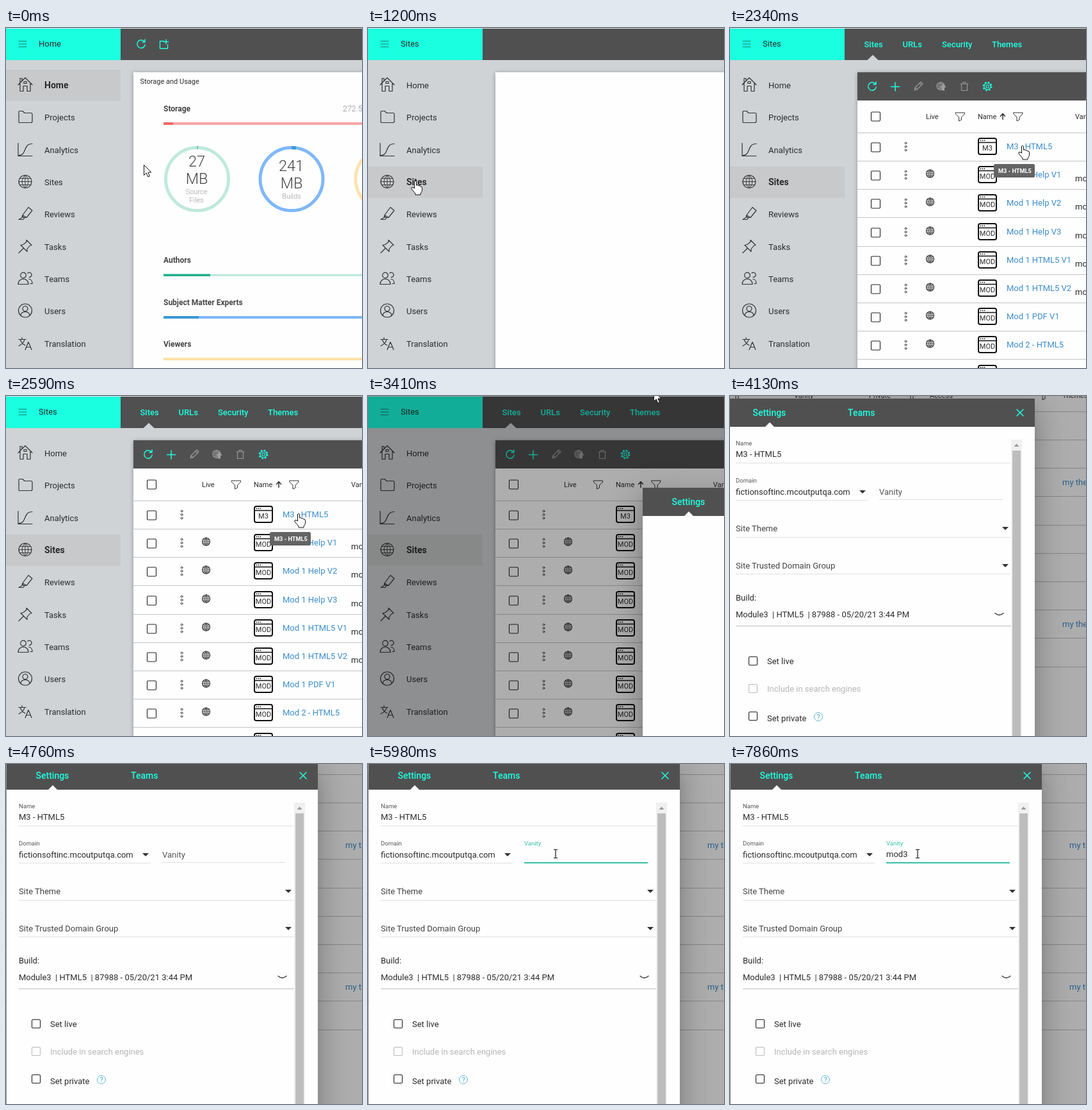
Write an HTML page that moves like this. It is 556x530 px and loops after 8000 ms.

```html
<!DOCTYPE html>
<html lang="en">
<head>
<meta charset="utf-8">
<title>Site settings</title>
<style>
html, body { margin: 0; width: 100%; height: 100%; overflow: hidden; }
#stage { position: relative; width: 556px; height: 530px; overflow: hidden; background: #cfd3d5; }
#world, #page, #shade, #dialog, #top { position: absolute; left: 0; top: 0; }
#page, #shade, #top { width: 1100px; height: 700px; }
#shade { background: rgba(0,0,0,.32); }
#dialog { left: 429px; top: 143px; width: 486px; height: 600px; background: #fefefe;
  box-shadow: 0 11px 15px -7px rgba(0,0,0,.2), 0 24px 38px 3px rgba(0,0,0,.14), 0 9px 46px 8px rgba(0,0,0,.12); }
svg { display: block; font: 13px Roboto, Arial, sans-serif; fill: #2b2b2b; }
.ln { fill: none; stroke: #333; stroke-width: 1.2; stroke-linejoin: round; stroke-linecap: round; }
.teal { stroke: #1fffe0; }
.dim { stroke: #9a9a9a; }
.s11 { font-size: 11px; }
.b { font-weight: 700; font-size: 12px; fill: #444; }
.tab { font-weight: 500; fill: #1fffe0; }
.big { font-size: 23.5px; font-weight: 300; fill: #444; text-anchor: middle; }
.sub { font-size: 11px; font-weight: 300; fill: #999; text-anchor: middle; }
.lab { font-size: 9.5px; fill: #555; }
.link { fill: #3b8ccb; }
</style>
</head>
<body>
<div id="stage"><div id="world">
  <svg id="page"></svg>
  <div id="shade"></div>
  <div id="dialog"><svg id="form" width="486" height="600"></svg></div>
  <svg id="top"></svg>
</div></div>
<script>
const $ = id => document.getElementById(id);
const text = (x, y, s, a = '') => `<text x="${x}" y="${y}" xml:space="preserve" ${a}>${s}</text>`;
const rect = (x, y, w, h, fill, a = '') => `<rect x="${x}" y="${y}" width="${w}" height="${h}" fill="${fill}" ${a}/>`;
const line = (d, cls = '', a = '') => `<path d="${d}" class="ln ${cls}" ${a}/>`;
const shape = (d, fill) => `<path d="${d}" fill="${fill}"/>`;
const disc = (x, y, r, cls = '', a = '') => `<circle cx="${x}" cy="${y}" r="${r}" class="ln ${cls}" ${a}/>`;
const at = (x, y, body, a = '') => `<g transform="translate(${x} ${y})" ${a}>${body}</g>`;
const box = (x, y, s, color = '#222') => rect(x, y, s, s, 'none', `rx="1.5" stroke="${color}" stroke-width="1.1"`);
const globe = (r, cls = '') => disc(0, 0, r, cls) + line(
  `M${-r} 0H${r}M0 ${-r}V${r}M${-r * .85} ${-r / 2}H${r * .85}M${-r * .85} ${r / 2}H${r * .85}` +
  `M0 ${-r}C${-r * .65} ${-r / 2} ${-r * .65} ${r / 2} 0 ${r}C${r * .65} ${r / 2} ${r * .65} ${-r / 2} 0 ${-r}`, cls, 'style="stroke-width:.9"');
const refresh = line('M5.2-3.5A6.2 6.2 0 1 0 6.2 1M6-7V-3H2', 'teal', 'style="stroke-width:1.5"');
const funnel = line('M-7-6H7V-4L2 1V5L-2 7V1L-7-4Z', '', 'style="stroke-width:1"');

// Sidebar
const menu = [
  ['Home', line('M-11 0L0-11 11 0M-8-2V10H-3V2H3V10H8V-2M-8-4V-10H-5V-7M-2-5H2V-2H-2Z')],
  ['Projects', line('M-10 8V-8q0-1 1-1h5l3 3h10q2 0 2 2V7q0 2-2 2H-9q-1 0-1-1z')],
  ['Analytics', line('M-11-10V10H11M-10 9C3 9-4-9 11-9')],
  ['Sites', globe(10)],
  ['Reviews', line('M-4 2L5-10 11-5 2 6H-3ZM-4 2L-5 6-10 9H-3L-1 6M-3 3L2 6')],
  ['Tasks', line('M2-10L10-2 7-1 3 4V8L-7-2-3-3 2-7ZM-3 3L-10 10')],
  ['Teams', disc(-3, -5, 4.3) + line('M-11 9C-11-2 5-2 5 9ZM4-8.5a3.7 3.7 0 1 1 2 6.5M6 1C9 1 11 4 11 8H8')],
  ['Users', disc(0, 0, 10.5) + disc(0, -3, 4) + line('M-7 7.5C-6 0 6 0 7 7.5')],
  ['Translation', line('M-10-6H1M-5-9V-6M-1-6C-2-1-6 2-10 4M-8-6C-6-1-3 2 0 3M0 10L5-2 10 10M2 6H8')]
];
const rowY = i => Math.round(89 + 50.35 * i);
const sidebar = rect(0, 0, 0, 48.5, '#c7c9ca', 'id="pick"') + menu.map(([name, icon], i) =>
  at(30, rowY(i) - .5, icon) + text(60, rowY(i) + 5, name, `id="m${i}"`)).join('');
const header = rect(0, 0, 1100, 1, '#e2e4e4') + rect(179, 1, 921, 49, '#505050') + rect(0, 1, 179, 49, '#1affdf') +
  line('M20 20.5H32M20 25H32M20 29.5H32', '', 'style="stroke:#17887a;stroke-width:1"') + text(51, 29, 'Home', 'id="title"');

// Home page
const bar = (y, h, dark, light, x) => rect(246, y, 800, h, light) + rect(246, y, x - 246, h, dark);
const ring = (x, color, dark, len) =>
  `<circle cx="${x}" cy="235.5" r="49" fill="none" stroke="${color}" stroke-width="5"/>` +
  `<circle cx="${x}" cy="235.5" r="49" fill="none" stroke="${dark}" stroke-width="5" stroke-dasharray="${len} 400" transform="rotate(-90 ${x} 235.5)"/>`;
const home = at(211, 25, refresh) +
  line('M247 20.5H240.500V32H252.500V26M250 18V25M246.500 21.500H253.500', 'teal', 'style="stroke-width:1.4"');
const storage = text(209.5, 87, 'Storage and Usage', 'class="s11"') +
  text(246, 130, 'Storage', 'class="b"') + text(526, 130, '272.5 MB', 'style="font-size:12.5px;font-weight:300;fill:#888"') +
  bar(147, 4, '#f16666', '#f9a6a6', 261) +
  ring(298.5, '#c0e9dd', '#24b28e', 1.2) + ring(446, '#7fb8fb', '#3c9bd5', 7) + ring(595, '#ffe2b0', '#f5b84a', 5) +
  text(298, 216, '27', 'class="big"') + text(298, 243, 'MB', 'class="big"') +
  text(297.5, 259, 'Source', 'class="sub"') + text(297.5, 272, 'Files', 'class="sub"') +
  text(445.5, 223, '241', 'class="big"') + text(446, 250, 'MB', 'class="big"') + text(446, 266, 'Builds', 'class="sub"') +
  text(246, 366, 'Authors', 'class="b"') + bar(383.500, 3.500, '#21b08c', '#c0e9dd', 319) +
  text(246, 432, 'Subject Matter Experts', 'class="b"') + bar(449, 4, '#3a98d2', '#7fb8fb', 301) +
  text(246, 497, 'Viewers', 'class="b"') + bar(514, 4, '#ffe2a8', '#ffe2a8', 246);

// Sites page
const names = ['M3 - HTML5', 'Mod 1 Help V1', 'Mod 1 Help V2', 'Mod 1 Help V3', 'Mod 1 HTML5 V1', 'Mod 1 HTML5 V2', 'Mod 1 PDF V1', 'Mod 2 - HTML5', ''];
const tableRow = (name, i) => {
  const y = Math.round(163 + 44.2 * i);
  return box(220.5, y + 16, 14) +
    [16.500, 22, 27.500].map(d => disc(274.5, y + d, 1.4, '', 'style="stroke-width:1"')).join('') +
    (i ? at(312.5, y + 20, globe(6)) : '') +
    rect(388, y + 9, 28, 25, 'none', 'rx="3" stroke="#111" stroke-width="2"') +
    line(`M388 ${y + 15.5}H416`, '', 'style="stroke:#111;stroke-width:1.6"') +
    line(`M391.5 ${y + 12.3}h0m3 0h0m3 0h0`, '', 'style="stroke:#111;stroke-width:1.8"') +
    text(402, y + 28, i ? 'MOD' : 'M3', 'class="s11" text-anchor="middle"') +
    text(432, y + 25.500, name, 'class="link"') +
    (i > 0 && i < 6 ? text(539, y + 32, 'mod1') : '') +
    (i == 2 || i == 7 ? text(958, y + 26.500, 'my theme', 'class="link"') : '') +
    rect(199, y + 44, 901, 1, '#c4c4c4');
};
const tabs = [[209.5, 'Sites'], [269.5, 'URLs'], [331, 'Security'], [409, 'Themes']];
const heads = [[306, 'Live'], [387, 'Name'], [539, 'Vanity'], [656, 'Private'], [751, 'Access'], [958, 'Themes']];
const sites = tabs.map(([x, s]) => text(x, 30, s, 'class="tab"')).join('') + shape('M214.500 50L223 42 231.500 50Z', '#cfd3d5') +
  rect(199, 69, 901, 44, '#505050') + at(222, 91, refresh) +
  line('M251.500 91.500H264.500M258 85V98', 'teal', 'style="stroke-width:1.5"') +
  at(294, 91, line('M-6 6L-5 2 4-7 7-4-2 5ZM2-5L5-2M-5 2L-2 5', 'dim')) +
  at(329, 90.500, globe(6, 'dim') + shape('M2 7V2H-1L4-3 9 2H6V7Z', '#a0a0a0')) +
  at(366, 91, line('M-6-4H6M-4.500-4V6.500H4.500V-4M-2-4V-6.500H2V-4', 'dim')) +
  at(402, 91, disc(0, 0, 2.2, 'teal') + disc(0, 0, 5, 'teal') +
    disc(0, 0, 6.4, 'teal', 'style="stroke-width:2;stroke-linecap:butt" stroke-dasharray="2.500 2.526"')) +
  box(220.5, 131, 14) + heads.map(([x, s]) => text(x, 142, s, 'class="s11"')).join('') +
  text(867, 125, 'Trusted', 'class="s11" text-anchor="middle"') + text(867, 138, 'Domain', 'class="s11" text-anchor="middle"') +
  [359.5, 450, 723, 929].map(x => at(x, 138, funnel)).join('') +
  line('M426 142.500V134M422.500 137.500L426 133.500 429.500 137.500', '', 'style="stroke-width:1.5"') +
  rect(199, 163, 901, 1, '#c4c4c4') + names.map(tableRow).join('');

$('page').innerHTML = rect(0, 0, 1100, 700, '#cfd3d5') + sidebar + header +
  rect(199, 69, 920, 700, '#fefefe', 'style="filter:drop-shadow(0 1px 3px rgba(0,0,0,.3))"') +
  `<g id="home">${home}${storage}</g><g id="sites">${sites}</g>`;

// Settings dialog
const drop = (x, y) => shape(`M${x - 5} ${y - 2.5}H${x + 5}L${x} ${y + 2.5}Z`, '#333');
const rule = (x, y, x2, c = '#e0e0e0') => rect(x, y, x2 - x, 1, c);
const fields = text(20, 69, 'Name', 'class="lab"') + text(20, 87, 'M3 - HTML5') + rule(20, 96, 449) +
  text(20, 127, 'Domain', 'class="lab"') + text(20, 146, 'fictionsoftinc.mcoutputqa.com') + rule(20, 154, 226) + drop(218, 141.5) +
  rule(244, 153, 437) + rect(244, 153, 193, 2, '#35c0a5', 'id="focus"') +
  text(0, 0, 'Vanity', 'id="vanity"') + text(244, 145, '', 'id="typed"') + rect(0, 133, 1, 15, '#222', 'id="caret"') +
  text(20, 203, 'Site Theme', 'fill="#444"') + rule(20, 212, 449) + drop(441, 198.5) +
  text(20, 261, 'Site Trusted Domain Group', 'fill="#444"') + rule(20, 269, 449) + drop(441, 256.5) +
  text(20, 311, 'Build:') + text(20, 337, 'Module3  | HTML5  | 87988 - 05/20/21 3:44 PM') + rule(20, 350, 450, '#bdbdbd') +
  line('M425 330.500Q431.500 336.500 438 330.500') +
  box(40.5, 398.5, 13) + text(69, 410, 'Set live') +
  box(40.5, 441.5, 13, '#bbb') + text(69, 453, 'Include in search engines', 'fill="#b5b5b5"') +
  box(40.5, 484.5, 13) + text(69, 499, 'Set private') +
  disc(149, 492, 6.5, '', 'style="stroke:#5fb7e2;stroke-width:1"') + text(149, 496, '?', 'class="s11" text-anchor="middle" fill="#3fa5d8"') +
  rect(450, 60, 17, 600, '#f0f0f0') + rect(452, 77, 13, 600, '#bdbdbd') + shape('M454.500 71L458.500 66.500 462.500 71Z', '#999');
$('form').innerHTML = rect(0, 0, 486, 44, '#505050') + `<g transform="translate(-1 4)">` +
  text(46.5, 23, 'Settings', 'class="tab" style="font-size:14px"') + text(195, 23, 'Teams', 'class="tab" style="font-size:14px"') +
  shape('M65.500 40.500L73 33 80.500 40.500Z', '#fefefe') + line('M459 13L469 23M469 13L459 23', 'teal', 'style="stroke-width:1.5"') +
  `<g id="fields">${fields}</g></g>` +
  at(243, 346, `<circle id="spin" r="40.500" fill="none" stroke="#1fffe0" stroke-width="9" pathLength="360" stroke-dasharray="195 165"/>`);

// Tooltip and pointers
$('top').innerHTML = `<g id="tip">${rect(412, 212, 64, 21, '#646464', 'rx="2.5"')}${text(419, 225.5, 'M3 - HTML5', 'style="font-size:9.2px;font-weight:700;fill:#fff"')}</g>
<g id="pointer">
<path id="arrow" d="M.5.5V16.500L4.200 13 6.800 19 9.400 17.900 6.900 12H11.800Z" fill="#fff" stroke="#111"/>
<path id="hand" d="M-1.500 12V1.500Q0-1 1.500 1.500V7Q4 5.500 4.500 8 7 6.500 7.500 9 10 8 10.500 11V15Q10 18 8 20V22H0V20L-6 13Q-7 10-4 10.500Z" fill="#fff" stroke="#111"/>
<path id="beam" d="M-3-6.500H-.500L0-6 .5-6.500H3M-3 6.500H-.500L0 6 .5 6.500H3M0-6V6" fill="none" stroke="#111" stroke-width="1.200"/>
</g>`;

const camera = [[0, 0, 0], [3550, -170, -56], [3700, -328, -107], [3850, -400, -129], [3990, -431, -137],
  [4130, -439, -139], [4260, -436, -142], [4400, -431, -145], [4500, -428, -147]];
const typing = [[0, ''], [6280, 'm'], [6420, 'mo'], [6570, 'mod'], [7430, 'mod3']];
const caretX = [244, 255, 262, 269, 276];
const travel = [[260, 930, 6, 215, 213, 74, 238], [1350, 2200, 7, 74, 238, 457, 183],
  [2727, 3405, 6, 457, 183, 446, -8], [3545, 3545, 1, 446, -8, 446, -40], [4760, 5290, 5, 752, 110, 721, 287]];

const last = (table, t) => table.filter(r => r[0] <= t).pop();
const steps = (t, a, b, n) => t < a ? 0 : t >= b ? 1 : (Math.floor((t - a) / (b - a) * (n - 1) + .05) + 1) / n;
const ease = p => p * p * (3 - 2 * p);
const show = (id, on) => { $(id).style.display = on ? '' : 'none'; };

function point(t) {
  const [a, b, n, x, y, x2, y2] = last(travel, t) || travel[0];
  const p = ease(steps(t, a, b, n));
  return [x + (x2 - x) * p, y + (y2 - y) * p];
}

function draw(t) {
  const [, cx, cy] = last(camera, t);
  $('world').style.transform = `translate(${cx}px,${cy}px)`;

  const picked = t < 1060 ? 0 : 3;
  $('title').textContent = menu[picked][0];
  $('pick').setAttribute('width', 179);
  $('pick').setAttribute('y', rowY(picked) - 24);
  menu.forEach((m, i) => { $('m' + i).style.font = i == picked ? '700 14px Roboto, Arial, sans-serif' : ''; });
  show('home', t < 1060);
  show('sites', t >= 1490);

  const open = steps(t, 2864, 3138, 3);
  $('shade').style.opacity = $('dialog').style.opacity = open;
  const loaded = t >= 3990;
  show('fields', loaded);
  show('spin', !loaded);
  $('spin').setAttribute('transform', `rotate(${40 + (t - 3700) * .36})`);

  const up = steps(t, 5420, 5690, 3);
  const label = $('vanity');
  label.setAttribute('x', t < 5420 ? 244 : 244);
  label.setAttribute('y', 146 - 19 * up);
  label.style.fontSize = 13 - 3.5 * up + 'px';
  label.style.fill = up ? '#35c0a5' : '#555';
  show('focus', up > 0);
  const typed = last(typing, t)[1];
  $('typed').textContent = typed;
  $('caret').setAttribute('x', caretX[typed.length]);
  show('caret', [[5420, 5980], [6280, 7140], [7430, 7860]].some(([a, b]) => t >= a && t < b));

  const [x, y] = point(t);
  $('pointer').setAttribute('transform', `translate(${Math.round(x)} ${Math.round(y)})`);
  const hand = t < 2727 && (x < 179 || (t > 1490 && x > 430 && y < 195));
  const beam = t > 4760 && y > 272;
  show('hand', hand);
  show('beam', beam);
  show('arrow', !hand && !beam && (t < 3545 || t >= 4760));
  show('tip', t >= 2335 && t < 2727);
}

const start = performance.now();
function tick() {
  draw((performance.now() - start) % 8000);
  requestAnimationFrame(tick);
}
tick();
</script>
</body>
</html>
```
